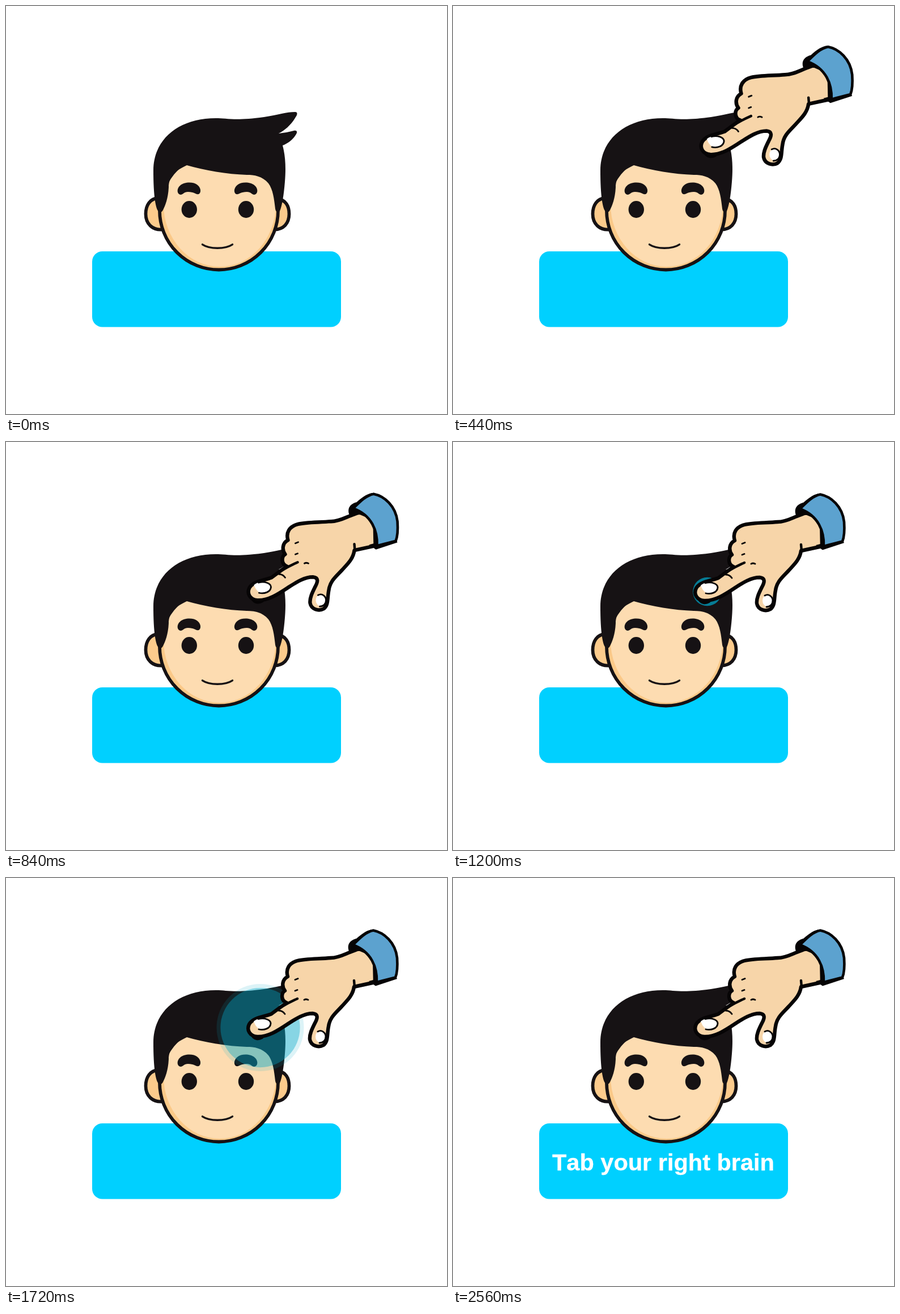
Write an HTML page that moves like this. It is 778 px wide and 720 px high and loops after 4.8 s.

```html
<!DOCTYPE html>
<html lang="en">
<head>
<meta charset="utf-8">
<title>Tab your right brain</title>
<style>
  html, body { margin: 0; width: 100%; height: 100%; overflow: hidden; background: #fff; }
  svg { display: block; width: 100vw; height: 100vh; }
  .ink { fill: #161214; }
  .line { stroke: #161214; stroke-width: 5.8; }
  .hand { stroke: #060405; stroke-width: 6.4; stroke-linecap: round; stroke-linejoin: round; }
  .thin { fill: none; stroke-width: 2.8; }
  .label { font: bold 41.5px "Liberation Sans", Arial, sans-serif; font-kerning: none;
    fill: #fff; stroke: #fff; stroke-width: .4; stroke-linejoin: round; }
</style>
</head>
<body>
<svg viewBox="0 0 778 720">
  <defs>
    <clipPath id="face"><circle cx="375.5" cy="361" r="104"/></clipPath>
    <clipPath id="wipe"><rect id="shown" x="170" y="470" width="0" height="70"/></clipPath>
    <path id="brow" d="M308 333C301 332 301 322 307 317C315 310 331 310 338 316C345 322 344 330 340 332C334 333 333 328 321 328C314 328 312 333 308 333Z"/>
  </defs>

  <rect x="152" y="433" width="439" height="133.5" rx="18" fill="#00d0ff"/>
  <g clip-path="url(#wipe)"><text class="label" x="175" y="515.7">Tab your right brain</text></g>

  <g id="head">
    <g class="line" fill="#fccb8c">
      <path d="M272 338.5C253 338.5 246.5 353 246.5 367C246.5 384 258 396 276 394.5Z"/>
      <path d="M478 341C494 341 499.5 354 499.5 367C499.5 383 490 395 472 394.5Z"/>
    </g>
    <g clip-path="url(#face)">
      <rect x="265" y="250" width="221" height="220" fill="#fbc988"/>
      <ellipse cx="377" cy="350" rx="99" ry="110" fill="#fddcb1"/>
    </g>
    <circle class="line" cx="375.5" cy="361" r="104.5" fill="none"/>
    <path class="ink" d="M271 364C264 362 260 335 260 290C260 235 305 198 370 198C390 198 405 203 455 196C480 192 495 187 510 187C515 187 514 192 511 196C503 210 492 219 481 225C490 224 500 222 508 220C514 219 514 223 512 226C507 235 498 242 488 246C493 265 494 285 492 310C490 335 487 352 483 362C480 366 476 364 475 358C473 340 471 324 463 313C452 300 438 298 425 298C390 297 350 290 319 281C300 290 287 300 287 320C286 340 281 352 277 360C275 364 273 364 271 364Z"/>
    <use href="#brow" class="ink"/>
    <use href="#brow" class="ink" transform="translate(746) scale(-1 1)"/>
    <ellipse class="ink" cx="323.3" cy="359" rx="13.7" ry="15"/>
    <ellipse class="ink" cx="423.5" cy="359" rx="13.7" ry="15"/>
    <path class="line" style="stroke-width:3.4" fill="none" stroke-linecap="round" d="M346.5 420.8C359 429.3 387 429.3 399.5 420.8"/>
  </g>

  <g fill="#00a4c6">
    <circle class="ripple" cx="448.5" cy="264" r="0"/>
    <circle class="ripple" cx="448.5" cy="264" r="0"/>
  </g>

  <g id="hand" class="hand">
    <path d="M435 277C438 284 446 284 451 281" fill="#060405"/>
    <path fill="#f7d5a9" d="M612 129C600 133 588 141 573 141C552 143 530 142 514 146C499 150 493 161 497 174C487 179 486 191 492 199C485 203 485 217 495 220L468 240C455 245 436 246 429 258C424 268 430 279 443 280C462 281 480 269 498 257C512 248 526 239 541 239C551 240 550 247 545 256C540 266 535 276 536 285C538 296 551 300 560 295C569 288 566 276 569 262C571 246 582 238 592 227C602 216 612 207 614 192L651 184L650 140L630 122Z"/>
    <path fill="#060405" stroke="none" d="M605 129C601 117 607 110 618 107C629 97 640 90 649 91L650 140L624 129ZM640 182L652 190.5L690 178L686 170Z"/>
    <path fill="#5ca2cf" stroke-width="4.6" d="M612 118C625 105 635 95 648 92.5C667 96 687 114 690 141C691 156 690 168 687 175.5C676 178 665 181 654 184C655 158 645 130 612 118Z"/>
    <path class="thin" style="stroke-width:4.4" d="M468 240C482 229 498 220 514 213M614 181L615 193"/>
    <path class="thin" d="M481 234Q488 234 492 240M510 179.5L515 177.5M510 199L514 197.5M526 215Q529 213 533 215"/>
    <g fill="#fff" stroke="none">
      <path d="M437 253Q444 247 455 248Q467 250 466 258Q463 267 452 268Q442 267 437 253Z"/>
      <ellipse cx="555" cy="280" rx="9" ry="10.5"/>
    </g>
    <path class="thin" d="M445 249C456 246 467 250 467 257C466 266 455 269 446 267M550 271C557 267 564 273 564 280C564 287 559 291 553 291"/>
  </g>
</svg>
<script>
  const LOOP = 4800, STEP = 40;
  const hand = document.getElementById("hand");
  const shown = document.getElementById("shown");
  const ripples = document.querySelectorAll(".ripple");

  const clamp = v => Math.min(1, Math.max(0, v));
  const ease = p => p < .5 ? 2 * p * p : 1 - 2 * (1 - p) ** 2;
  const span = (t, start, length) => clamp((t - start) / length);

  function draw(t) {
    // the hand shrinks slightly towards its cuff while it approaches
    const left = 1 - ease(span(t, 65, 875));
    hand.setAttribute("transform", `translate(${692 + 22.5 * left} ${90 - 32.5 * left}) scale(${1 + .022 * left}) translate(-692 -90)`);
    hand.setAttribute("opacity", span(t, 0, 200));

    ripples.forEach((ring, i) => {
      const start = 1110 + 220 * i;
      ring.setAttribute("r", t < start ? 0 : 22 + 55 * ease(span(t, start, 520)));
      ring.setAttribute("opacity", .83 * (1 - span(t, start, 730)));
    });

    shown.setAttribute("width", t < 1800 ? 0 : t >= 2560 ? 420 : 104 + (t - 2000) * .515);
  }

  const begin = performance.now();
  function tick() {
    const t = (performance.now() - begin) % LOOP;
    draw(Math.floor(t / STEP) * STEP);
    requestAnimationFrame(tick);
  }
  tick();
</script>
</body>
</html>
```
